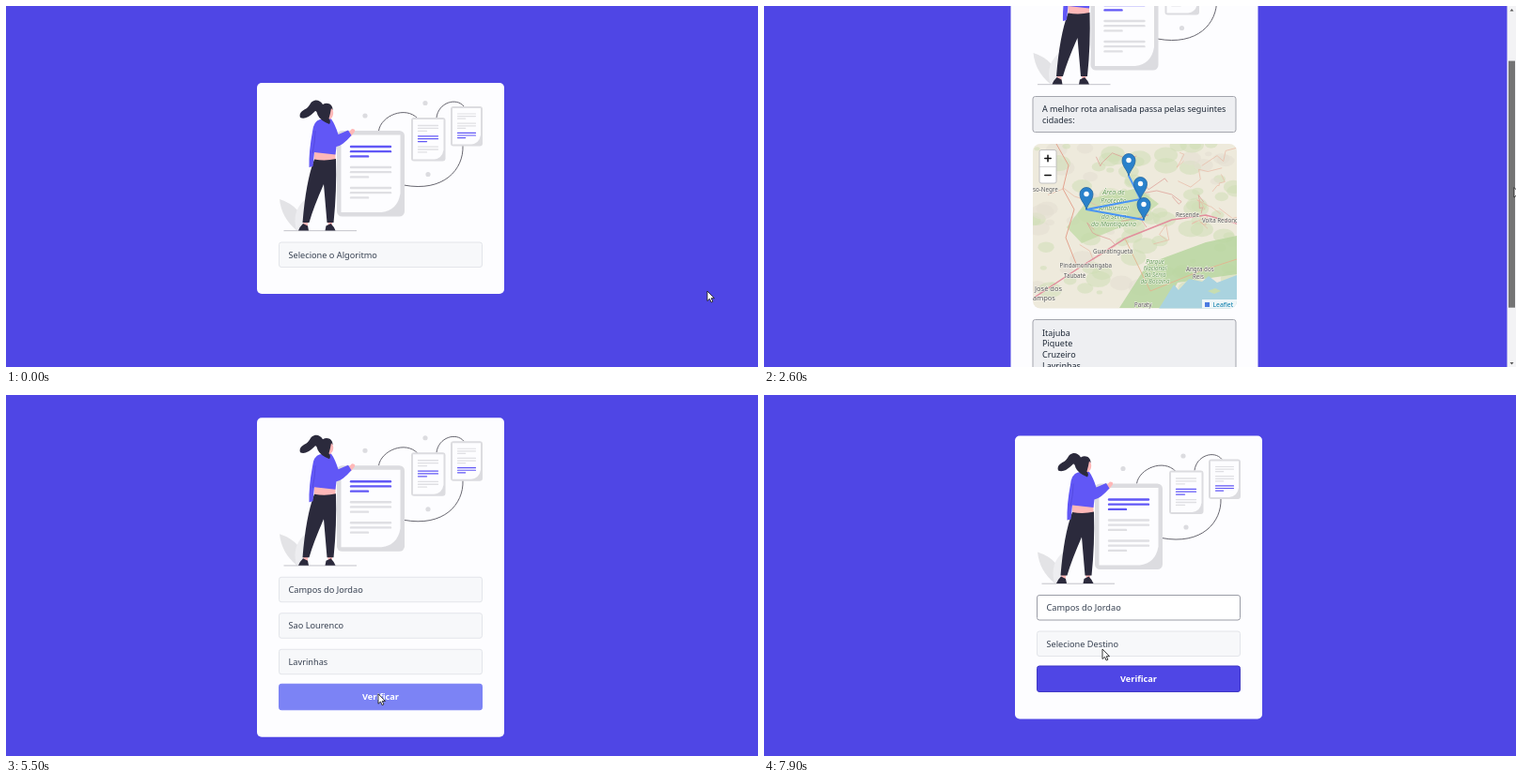
Recreate the animation shown at these times as an HTML page. Size 800x385 px, loop 8000 ms.

```html
<!DOCTYPE html>
<html lang="pt-BR">
<head>
<meta charset="utf-8">
<title>Melhor rota</title>
<style>
html, body { margin: 0; width: 100%; height: 100%; overflow: hidden; background: #4f46e5; }
svg { display: block; }
text { font: 9.2px "Noto Sans", "Open Sans", sans-serif; fill: #374151; }
text.btn { font-weight: 600; fill: #fff; text-anchor: middle; }
text.res { font-size: 9px; fill: #1f2937; }
text.item { font-size: 9px; fill: #3c3c3c; }
#map text { font-size: 6.2px; fill: #555; stroke: #f7f5ee; stroke-width: 1.2px; paint-order: stroke; }
#map text.big { font-size: 7.5px; }
#map text.park { font-style: italic; fill: #5f9a52; text-anchor: middle; }
#map text.link { fill: #0078a8; stroke: none; }
</style>
</head>
<body>
<svg width="800" height="385" viewBox="0 0 800 385">
  <defs>
    <filter id="shade" x="-10%" y="-10%" width="120%" height="120%">
      <feDropShadow dx="0" dy="2" stdDeviation="2.5" flood-opacity=".45"/>
    </filter>
    <clipPath id="mapClip"><rect x="286" y="147" width="217" height="175.5" rx="8"/></clipPath>
    <g id="art">
      <path fill="#e3e3e6" d="M291 206Q316 214 319 239H309Q293 226 291 206Z"/>
      <path fill="#ededf0" d="M321 204Q303 217 309 239H319Q326 225 321 204Z"/>
      <path d="M295.500 239.700H373" stroke="#bdbdc3" stroke-width=".9"/>
      <g fill="none" stroke="#56555f" stroke-width=".9">
        <path d="M396.500 133C399 117 425 106 438 120"/>
        <path d="M458 119C460 103 479 97 487 107"/>
        <path d="M486 149C487 174 466 199 423 191"/>
      </g>
      <path d="M382 117h0M446 103.500h0M449 179.500h0" stroke="#dcdce0" stroke-width="5.200" stroke-linecap="round"/>
      <g id="sheets"></g>
      <path fill="#ffb8b8" d="M363 136L368 131Q372 131 371 134L367 139ZM328 155h22.500v10H328ZM338 115h8v10h-8ZM316.500 228h4.500v8h-5ZM342 228h5v8h-4Z"/>
      <path fill="#2b2a3c" d="M328 163.500Q340 165.500 351 163Q352 197 348.500 231H341.500L338 190Q327 215 322.500 231H315.500Q319 187 328 163.500Z"/>
      <path id="shoe" fill="#2b2a3c" d="M316 232L321 234.500L322 239.500H311Q312 236 316 232Z"/>
      <use href="#shoe" transform="matrix(-1 0 0 1 661.500 0)"/>
      <path fill="#6157f6" d="M334 121L346 120.500Q350 126 353.500 137L364 132.500L367.500 138Q358 149 351.500 150L350.500 158.500L328 156L326.500 171L322.500 172Q322 155 326 134Q327 123 334 121Z"/>
      <path d="M329 133Q329 145 326 157" fill="none" stroke="#5046d8" stroke-width=".7"/>
      <ellipse cx="344.500" cy="114" rx="3.700" ry="6" fill="#ffb8b8"/>
      <path fill="#2b2a3c" d="M346 109Q345 115 343.500 120Q346 123 344 126Q334 122 331.500 116Q330 110 328 113Q319 122 313 119C311 113 317 111 320 109C324 106 323 102 329 100.500Q334 100 337 105C342 102 348 105 347.500 111Z"/>
    </g>
    <g id="pin">
      <path d="M0 0C-1.500-6-7-10-7-16.500A7 7 0 0 1 7-16.500C7-10 1.500-6 0 0Z" fill="#2a81cb" stroke="#24669f" stroke-width=".8"/>
      <circle cy="-16.500" r="2.700" fill="#fff"/>
    </g>
    <g id="map"></g>
  </defs>
  <rect width="800" height="385" fill="#4f46e5"/>
  <g id="scene"></g>
  <path id="mouse" d="M0 0V10.500L2.500 8.300L4.200 12L5.900 11.200L4.300 7.700H7.500Z" fill="#fff" stroke="#222" stroke-width=".9"/>
</svg>
<script>
const $ = id => document.getElementById(id);
const rect = (x, y, w, h, fill, more = '') =>
  `<rect x="${x}" y="${y}" width="${w}" height="${h}" fill="${fill}" ${more}/>`;
const text = (x, y, s, cls = '', more = '') => `<text x="${x}" y="${y}" class="${cls}" ${more}>${s}</text>`;
const stroke = (d, color, width) =>
  `<path d="${d}" fill="none" stroke="${color}" stroke-width="${width}" stroke-linecap="round" stroke-linejoin="round"/>`;

// A sheet of paper with a curled corner and three paragraphs, one highlighted
function sheet({ x, y, w, h, edge, curl, left, len, top, gap, pitch, hot }) {
  const iw = w - 2 * edge, ih = h - 2 * edge;
  let s = rect(x, y, w, h, '#dcdce0', `rx="${edge + 1}"`) +
    `<path fill="#fdfdff" d="M${x + edge} ${y + edge}h${iw}v${ih - curl}q${-curl * .15} ${curl * .9} ${-curl} ${curl}h${curl - iw}z"/>`;
  for (let i = 0; i < 9; i++) {
    const para = Math.floor(i / 3), row = i % 3;
    s += stroke(`M${left} ${top + para * gap + row * pitch}h${row < 2 ? len : len * .43}`,
      para === hot ? '#6157f6' : '#dfdfe3', pitch * .45);
  }
  return s;
}
$('sheets').innerHTML =
  sheet({ x: 352, y: 133, w: 72, h: 91.5, edge: 4.5, curl: 20, left: 367, len: 42, top: 150, gap: 22, pitch: 5.2, hot: 0 }) +
  sheet({ x: 431, y: 119, w: 36.5, h: 46.5, edge: 2, curl: 10, left: 438.5, len: 21, top: 127.5, gap: 11.3, pitch: 2.9, hot: 1 }) +
  sheet({ x: 473, y: 107, w: 34, h: 42.5, edge: 2, curl: 10, left: 480.5, len: 19, top: 115, gap: 10.2, pitch: 2.6, hot: 2 });

function drawMap() {
  let seed = 11;
  const rnd = n => (seed = seed * 16807 % 2147483647) / 2147483647 * n;
  let s = rect(286, 147, 217, 176, '#eeeadc');
  for (let i = 0; i < 110; i++) {
    const r = 2 + rnd(7);
    s += `<ellipse cx="${286 + rnd(217)}" cy="${147 + rnd(160)}" rx="${r * 1.5}" ry="${r}" fill="${
      rnd(1) < .7 ? '#cfdfb6' : '#e4dfd2'}" opacity=".55"/>`;
  }
  s += '<path d="M322 236L345 206L398 194L420 211L398 228L338 253Z" fill="#c3dba8" opacity=".8"/>' +
    '<path d="M378 322L408 275L470 252L503 245V286L440 295L425 322Z" fill="#b9d6a0" opacity=".85"/>' +
    '<path d="M420 323L436 297L441 303L452 291L466 294L473 288L482 295L503 287V323Z" fill="#aad3df"/>' +
    '<path d="M472 304l8-3 6 3-7 3z" fill="#c7ddb0"/>';
  for (let i = 0; i < 16; i++) {
    let d = `M${286 + rnd(200)} ${147 + rnd(110)}`;
    for (let k = 0; k < 5; k++) d += `l${rnd(28) - 9} ${rnd(24) - 12}`;
    s += stroke(d, i % 3 ? '#e9b9a5' : '#dd9a92', .7);
  }
  s += stroke('M286 312L334 280L384 248L434 228L470 223L503 232', '#e28f9d', 1.5) +
    stroke('M311 147L324 170L318 195L330 217L321 247L334 280', '#e3a38f', 1) +
    stroke('M384 248L411 304L463 283L503 270', '#e4b48f', .9);
  s += text(286, 198, 'so-Negre') + text(438, 225, 'Resende') + text(466, 231, 'Volta Redonda') +
    text(350, 264, 'Guaratinguetá') + text(314.5, 279, 'Pindamonhangaba') + text(319, 290, 'Taubaté') +
    text(449, 283, 'Angra dos') + text(456, 291, 'Reis') + text(394, 321, 'Paraty') +
    text(288, 304, 'José dos', 'big') + text(286, 314, 'ampos', 'big');
  ['Área de', 'Proteção', 'Ambiental', 'da Serra', 'da Mantiqueira'].forEach((w, i) =>
    s += text(372, 201 + i * 8.5, w, 'park', 'style="font-size:7px"'));
  ['Parque', 'Nacional', 'da Serra', 'da Bocaina'].forEach((w, i) => s += text(416, 275 + i * 7, w, 'park'));
  s += rect(466, 313, 37, 9.5, '#fff', 'opacity=".8"') + rect(469, 316, 5, 5, '#4c7be1') +
    text(477.5, 320.5, 'Leaflet', 'link', 'style="font-size:6.8px"') +
    rect(293, 153.5, 18, 35.5, '#fff', 'rx="2" stroke="#bbb" stroke-width=".9"') +
    stroke('M293 171.5h18', '#ccc', .8) +
    stroke('M298.8 162.5h6.4M302 159.3v6.4M298.8 180.5h6.4', '#111', 1.5);
  $('map').innerHTML = `<g clip-path="url(#mapClip)">${s}</g>`;
}
drawMap();

const ALG = 'Selecione o Algoritmo', FROM = 'Selecione a Origem', TO = 'Selecione Destino', VIA = 'Selecione Parada';
const algs = [ALG, 'Custo Uniforme', 'Greedy', 'A Estrela', 'Amplitude', 'Profundidade',
  'Profundidade Limitada', 'Bidirecional', 'Aprofundamento Interativo'];
const cities = ['Silveiras', 'Bananal', 'Passa Quatro', 'Cruzeiro', 'Queluz', 'Resende', 'Lorena',
  'Cachoeira Paulista', 'Lavrinhas', 'Piquete', 'Areias', 'Guaratingueta', 'Itajuba', 'Sao Lourenco',
  'Itanhandu', 'Itatiaia', 'Taubate', 'Campos do Jordao', 'Pindamonhangaba', 'Aparecida', 'Roseira', 'Caçapava'];
const PITCH = 11.83, ALG_Y = 287;

const card = (y, h) => rect(267, y, 263, h, '#fdfdff', 'rx="5"') + `<use href="#art" y="${y - 82}"/>`;
const button = (y, label, hot) =>
  rect(290.5, y, 216, 27.5, hot ? '#7c83f5' : '#4f46e5', `rx="2.5" stroke="${hot ? '#7c83f5' : '#3f37c4'}"`) +
  text(398.5, y + 17, label, 'btn');
const popup = (y, h) => rect(291, y, 215.5, h, '#fff', 'stroke="#8a8a8a" filter="url(#shade)"');

const isHome = s => s.f[0] === ALG;
const cardHeight = s => isHome(s) ? 225 : 225 + 38.5 * s.f.length;
const fieldY = (s, i) => 364.5 - cardHeight(s) / 2 + 38.5 * i;
const cityY = (s, name) => fieldY(s, s.focus) - 9.5 - PITCH * (cities.length - 1 - cities.indexOf(name));

function options(list, first, hot, right) {
  return list.map((name, i) => {
    const y = first + i * PITCH, on = name === hot, off = name === ALG;
    return (on ? rect(291, y - 6, right - 291, PITCH, off ? '#b3b3b3' : '#696969') : '') +
      text(300.5, y + 3.2, name, 'item', on ? 'style="fill:#f4f4f4"' : off ? 'style="fill:#8d8d8d"' : '');
  }).join('');
}

function form(state) {
  const { f, focus, hot, hover } = state;
  let s = card(fieldY(state, 0) - 170, cardHeight(state));
  f.forEach((label, i) => {
    const on = i === focus, y = fieldY(state, i);
    s += rect(290.5, y, 216, 26.5, on ? '#fff' : '#f7f8fa',
      `rx="2.5" stroke="${on ? '#9a9ca6' : '#e3e5ea'}"`) + text(300.5, y + 16.7, label);
  });
  if (!isHome(state)) s += button(fieldY(state, f.length) - 1.5, 'Verificar', hover);
  if (!hot) return s;
  if (isHome(state)) return s + popup(281, 120) + options(algs, ALG_Y, hot, 506);
  const end = fieldY(state, focus) - 2.5;
  return s + popup(-10, end + 10) + options(cities, cityY(state, cities[0]), hot, 497.5) +
    rect(497.5, -5, 8.5, end + 4.5, '#f4f4f4') + rect(498.5, -5, 6.5, end - 33, '#bdbdbd') +
    `<path d="M499.5 ${end - 6.5}h4.4l-2.2 2.8z" fill="#444"/>`;
}

const pageHeight = route => 492 + route.length * 12;
const backY = route => 434.5 + route.length * 12;
const thumbShift = (route, scroll) => scroll / pageHeight(route) * 369;

function result({ route, line, hover }, scroll) {
  const H = pageHeight(route);
  const box = (y, h) => rect(290.5, y, 216, h, '#eeeff2', 'rx="2.5" stroke="#a3a5ad"');
  const s = card(0, H) + box(170.5, 38) +
    text(300.5, 187, 'A melhor rota analisada passa pelas seguintes', 'res') + text(300.5, 199, 'cidades:', 'res') +
    box(408.5, 14 + route.length * 12) + route.map((c, i) => text(300.5, 425.5 + i * 11.9, c, 'res')).join('') +
    button(backY(route), 'Voltar', hover) +
    '<g transform="translate(4.5 74)"><use href="#map"/>' +
    `<g opacity=".85">${stroke('M' + line.map(p => p.join(' ')).join('L'), '#3388ff', 1.9)}</g>` +
    [...line].sort((a, b) => a[1] - b[1]).map(([x, y]) => `<use href="#pin" x="${x}" y="${y}"/>`).join('') + '</g>';
  return `<g transform="translate(-4.5 ${-scroll})">${s}</g>` + rect(790.5, 0, 9.5, 385, '#f3f3f5') +
    rect(792, 8 + thumbShift(route, scroll), 7, 369 * 385 / H, '#747474') +
    '<path d="M793.5 5.5h4l-2-2.5zM793.5 380h4l-2 2.5z" fill="#555"/>';
}

// Where the pointer must be for a state; undefined keeps it still
function target(s) {
  if (s.at) return s.at;
  if (s.route) {
    if (s.hover) return [392, backY(s.route) + 10 - s.scroll];
    return s.drag && [798, 143 + thumbShift(s.route, s.scroll)];
  }
  if (s.hover) return [396, fieldY(s, s.f.length) + 9];
  if (s.hot === ALG) return [414, 269];
  if (s.hot && isHome(s)) return [344, ALG_Y + algs.indexOf(s.hot) * PITCH + 2];
  if (s.opening) return [348, fieldY(s, s.focus) + 12];
  if (s.hot) return [351, cityY(s, s.hot) - 1.5];
}

const steps = [];
let here = [746, 304];
function add(time, state) {
  here = target(state) || here;
  steps.push({ time, state, mouse: here });
}
const open = (time, hot) => add(time, { f: [ALG], focus: 0, hot });
function pick(time, f, focus, name) {
  const done = f.map((label, i) => i === focus ? name : label);
  add(time, { f, focus, hot: 'Caçapava', opening: true });
  add(time + 100, { f, focus, hot: name });
  add(time + 200, { f: done, focus });
  return done;
}
function browse(time, page, dragTime, drags) {
  add(time, { ...page, scroll: 0 });
  add(dragTime, { ...page, scroll: 0, drag: true });
  drags.forEach(([t, scroll]) => add(t, { ...page, scroll, drag: true }));
}

const first = {
  route: ['Itajuba', 'Piquete', 'Cruzeiro', 'Lavrinhas'],
  line: [[388, 181], [400.5, 206], [343, 217], [404, 228]]
};
const second = {
  route: ['Campos do Jordao', 'Itajuba', 'Itanhandu', 'Sao Lourenco', 'Passa Quatro', 'Cruzeiro', 'Lavrinhas'],
  line: [[328, 241], [343, 217], [391, 197], [388, 181], [400.5, 206], [404, 228]]
};

add(0, { f: [ALG] });
open(500, ALG);
open(700, 'Custo Uniforme');
let f = [FROM, TO];
add(1000, { f });
f = pick(1200, f, 0, 'Itajuba');
f = pick(1600, f, 1, 'Lavrinhas');
add(1900, { f, hover: true });
browse(2000, first, 2300, [[2600, 74], [2800, 155]]);
add(3000, { ...first, scroll: 155, hover: true });
add(3100, { f: [ALG] });
open(3400, ALG);
open(3600, ALG);
open(3700, 'Bidirecional');
f = [FROM, TO, VIA];
add(3900, { f });
f = pick(4000, f, 0, 'Campos do Jordao');
f = pick(4400, f, 1, 'Sao Lourenco');
f = pick(4800, f, 2, 'Lavrinhas');
add(5400, { f, hover: true });
browse(5600, second, 5900, [[6200, 191]]);
add(6400, { ...second, scroll: 191, hover: true });
add(6600, { f: [ALG] });
open(6800, ALG);
open(6900, 'Greedy');
open(7000, 'Amplitude');
f = [FROM, TO];
add(7300, { f });
f = pick(7400, f, 0, 'Campos do Jordao');
add(7900, { f, focus: 0, at: [360, 271] });

let last = -1;
const start = performance.now();
function draw() {
  const t = Math.floor((performance.now() - start) % 8000 / 100) * 100;
  if (t !== last) {
    last = t;
    const a = steps.filter(s => s.time <= t).pop();
    const b = steps[steps.indexOf(a) + 1] || a;
    const k = a === b ? 0 : (t - a.time) / (b.time - a.time);
    const mix = (p, q) => p + (q - p) * k;
    const s = a.state;
    $('scene').innerHTML = s.route ? result(s, mix(s.scroll, b.state.scroll ?? s.scroll)) : form(s);
    $('mouse').setAttribute('transform', `translate(${mix(a.mouse[0], b.mouse[0])} ${mix(a.mouse[1], b.mouse[1])})`);
  }
  requestAnimationFrame(draw);
}
draw();
</script>
</body>
</html>
```
